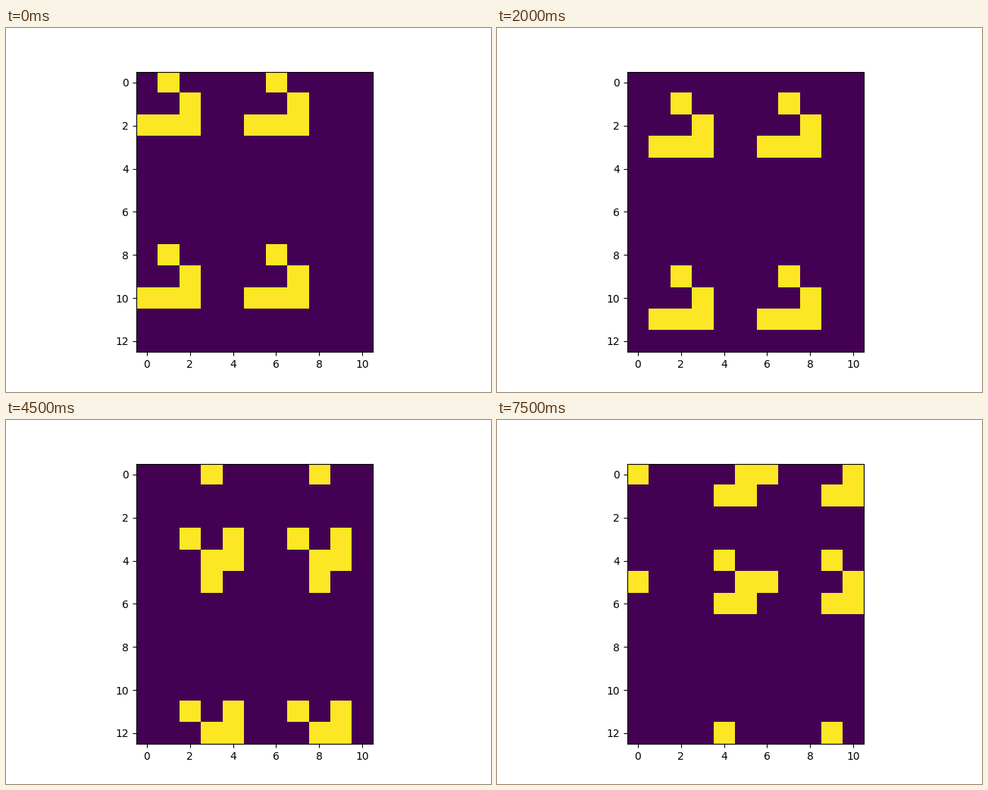
These frames come from a looping animation (640 by 480 pixels, 8 s). A matplotlib script:

```python
import numpy as np
import matplotlib.pyplot as plt
from matplotlib.animation import FuncAnimation

ROWS, COLS = 13, 11
STEPS = 16
STEP_MS = 500

GLIDER = np.array([[0, 1, 0],
                   [0, 0, 1],
                   [1, 1, 1]])


def start_grid():
    grid = np.zeros((ROWS, COLS), dtype=int)
    for r in (0, 8):
        for c in (0, 5):
            grid[r:r + 3, c:c + 3] = GLIDER
    return grid


def next_grid(grid):
    """One Game of Life step on a torus."""
    around = sum(np.roll(grid, (dr, dc), axis=(0, 1))
                 for dr in (-1, 0, 1) for dc in (-1, 0, 1) if dr or dc)
    return ((around == 3) | ((grid == 1) & (around == 2))).astype(int)


grids = [start_grid()]
while len(grids) < STEPS:
    grids.append(next_grid(grids[-1]))

fig, ax = plt.subplots(figsize=(6.4, 4.8), dpi=100)
image = ax.imshow(grids[0], cmap="viridis", vmin=0, vmax=1)


def update(i):
    image.set_data(grids[i])
    return (image,)


anim = FuncAnimation(fig, update, frames=STEPS, interval=STEP_MS,
                     repeat=True, repeat_delay=0)
plt.show()
```
